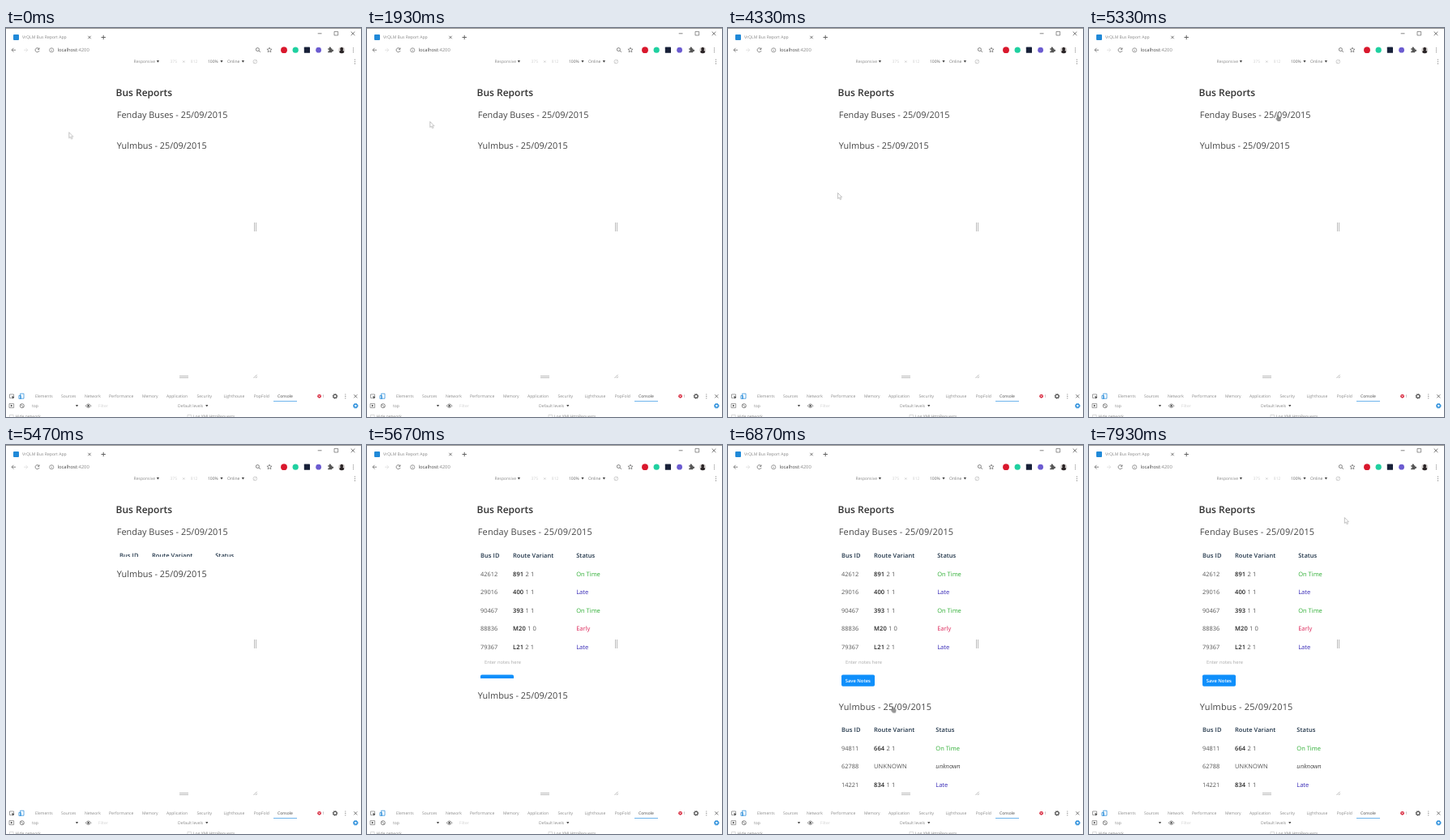
Animation, 438 px wide and 480 px high, one loop 8 s. Source, as an HTML page:

```html
<!DOCTYPE html>
<html lang="en">
<head>
<meta charset="utf-8">
<title>Bus Report App</title>
<style>
  html, body { margin: 0; width: 100%; height: 100%; overflow: hidden; background: #fff; }
  body, text { font-family: "Open Sans", "Noto Sans", sans-serif; text-rendering: geometricPrecision; }
  #stage { position: relative; width: 438px; height: 480px; overflow: hidden; }
  #stage > svg { position: absolute; left: 0; top: 0; }
  #page { position: absolute; left: 0; top: 0; width: 438px; height: 432px; overflow: hidden; }
  #page h1 { position: absolute; left: 135.5px; top: 70px; margin: 0; font: 600 12px/20px "Open Sans", "Noto Sans", sans-serif; color: #333; white-space: nowrap; }
  #list { position: absolute; left: 0; top: 90px; width: 438px; }
  .title { height: 34px; line-height: 36px; padding-left: 136.8px; font-size: 10.9px; color: #444; white-space: nowrap; }
  .panel { height: 0; overflow: hidden; margin-bottom: 4px; }
  .panel svg { display: block; }
  .line { fill: none; stroke: #666; stroke-width: .8; }
</style>
</head>
<body>
<div id="stage">
  <div id="page">
    <h1>Bus Reports</h1>
    <div id="list">
      <div class="title" id="title1">Fenday Buses - 25/09/2015</div>
      <div class="panel" id="panel1"></div>
      <div class="title" id="title2">Yulmbus - 25/09/2015</div>
      <div class="panel" id="panel2"></div>
    </div>
  </div>
  <svg id="chrome" width="438" height="480"></svg>
  <svg width="438" height="480">
    <path id="arrow" d="M.5 .5V7.6L2.2 6.2L3.4 8.8L4.6 8.2L3.5 5.8H5.6Z" fill="#fff" stroke="#aaa" stroke-width=".7"/>
    <path id="hand" d="M1.6 .6Q2.6 .2 2.7 1.2V2.8L5 3.3Q6 3.7 5.8 4.8L5.2 7.6H2.2L.4 5.2Q.2 4.2 1.6 4.5Z" fill="#999" stroke="#777" stroke-width=".8"/>
  </svg>
</div>
<script>
const LOOP = 8000;
const $ = id => document.getElementById(id);

const text = (x, y, s, size = 5, fill = '#888', extra = '') =>
  `<text x="${x}" y="${y}" font-size="${size}" fill="${fill}" ${extra}>${s}</text>`;
const line = (d, color = '#666', width = .8) =>
  `<path class="line" d="${d}" style="stroke:${color};stroke-width:${width}"/>`;
const dot = (x, y, r, fill) => `<circle cx="${x}" cy="${y}" r="${r}" fill="${fill}"/>`;
const ring = (x, y, r, color = '#666', width = .8) =>
  `<circle cx="${x}" cy="${y}" r="${r}" fill="none" stroke="${color}" stroke-width="${width}"/>`;
const box = (x, y, w, h, fill, rx = 0) =>
  `<rect x="${x}" y="${y}" width="${w}" height="${h}" rx="${rx}" fill="${fill}"/>`;
const frame = (x, y, w, h, color = '#666') => line(`M${x} ${y}h${w}v${h}h${-w}z`, color, .7);
const cross = (x, y, r, color = '#555') =>
  line(`M${x - r} ${y - r}l${2 * r} ${2 * r}M${x + r} ${y - r}l${-2 * r} ${2 * r}`, color, .8);
const dots = (x, y, color = '#777') => [-2.4, 0, 2.4].map(d => dot(x, y + d, .6, color)).join('');
const caret = (x, y) => `<path d="M${x - 1.6} ${y - 1.3}h3.2l-1.6 2.7z" fill="#444"/>`;
const gear = (x, y, color) => ring(x, y, 2, color, 1.2) +
  `<circle cx="${x}" cy="${y}" r="2.9" fill="none" stroke="${color}" stroke-width=".9" stroke-dasharray="1.14"/>`;

function star(x, y, r) {
  const pts = Array.from({ length: 10 }, (_, i) => {
    const a = i * Math.PI / 5, k = i % 2 ? r * .45 : r;
    return `${x + k * Math.sin(a)} ${y - k * Math.cos(a)}`;
  });
  return line(`M${pts.join('L')}Z`, '#666', .7);
}

function browserBar() {
  return box(0, 0, 438, 1, '#999') +
    box(9, 8, 7, 7, '#2089d8', 1) + text(20, 13.4, 'VrQLM Bus Report App', 5.1) +
    cross(103, 11.5, 1.7) + line('M117.5 11.5h5.4M120.2 8.8v5.4', '#555', .9) +
    line('M384.7 6.8h4.8') + frame(405, 4.4, 4.6, 4.6) + cross(428, 6.8, 2.3) +
    line('M12 27.2H7M9.4 24.8L7 27.2L9.4 29.6') +
    line('M22 27.2h4.8M24.5 24.9l2.3 2.3l-2.3 2.3', '#ddd') +
    line('M40.7 25.8A2.5 2.5 0 1 0 41 28M41 24.4v1.9h-2') +
    ring(56.2, 27.3, 2.6, '#777', .7) + line('M56.2 27v1.7M56.2 25.5v.7', '#777', .7) +
    text(63.6, 29.3, 'localhost<tspan fill="#888">:4200</tspan>', 5.8, '#444') +
    ring(310.4, 26.5, 2) + line('M312 28l1.9 1.9') + star(325, 27.2, 3.2) +
    dot(343, 27.2, 3.9, '#d9182d') + dot(357.2, 27.2, 3.6, '#1fd0a0') +
    box(367.8, 23.6, 7.2, 7.2, '#172038', .6) + dot(385.6, 27.2, 3.4, '#6b5bd0') +
    '<path d="M397.2 25.2h1.6a1.2 1.2 0 1 1 2 0h1.5v1.6a1.2 1.2 0 1 1 0 2v1.5h-5.1v-1.7a1 1 0 1 0 0-1.8z" fill="#555"/>' +
    dot(414.2, 27.2, 4, '#d8d4d2') +
    '<path d="M411.2 29.9q.3-2.2 1.7-2.5a2 2 0 1 1 2.6 0q1.4.3 1.7 2.5a4 4 0 0 1-6 0z" fill="#2b2527"/>' +
    dots(428.5, 27.2);
}

function deviceBar() {
  return text(157.6, 43.3, 'Responsive') + caret(187.4, 41.4) +
    text(202.5, 43.3, '375', 5, '#d0d0d0') + cross(219.3, 41.5, 1, '#bbb') +
    text(227.8, 43.3, '812', 5, '#d0d0d0') +
    text(249, 43.3, '100%', 5, '#666') + caret(266, 41.4) +
    text(273, 43.3, 'Online', 5, '#777') + caret(292.4, 41.4) +
    ring(307.3, 41.5, 2.3, '#bbb', .7) + line('M305 43.5l4.6-4', '#ccc', .6) +
    dots(430.5, 41.5) +
    line('M306.5 240v11M308.5 240v11M214 429.5h11M214 431.5h11', '#aaa') +
    line('M305.5 432l4.2-4.2M308 432l1.8-1.8', '#999', .7);
}

function devTools() {
  const tabs = [['Elements', 36], ['Sources', 68], ['Network', 97], ['Performance', 127],
    ['Memory', 168], ['Application', 198], ['Security', 235.5], ['Lighthouse', 268.5],
    ['PopFold', 305.8]];
  return frame(4.5, 452, 5, 4.6, '#777') + '<path d="M7 454l3.6 1.6l-1.5.5l-.7 1.6z" fill="#444"/>' +
    frame(17.6, 451.2, 4.4, 6, '#1a86d9') + frame(15.9, 453.6, 2.6, 3.8, '#1a86d9') +
    tabs.map(([s, x]) => text(x, 456.4, s)).join('') +
    text(335, 456.4, 'Console', 5, '#444') + box(330, 460, 29, 1, '#6fb4ec') +
    dot(386.6, 454.3, 2.4, '#d93045') + cross(386.6, 454.3, .8, '#fff') +
    text(390.3, 456.2, '1', 4.8) + gear(406, 454.4, '#555') + dots(418.8, 454.4) + cross(431.3, 454.4, 2) +
    frame(4, 463.6, 5.6, 5, '#777') + '<path d="M5.9 464.7l2.4 1.4l-2.4 1.4z" fill="#444"/>' +
    ring(19.8, 466.2, 2.5) + line('M18 464.4l3.6 3.6') +
    text(32, 468, 'top') + caret(87.5, 466.2) +
    line('M98.3 466.2q3.3-4.4 6.6 0q-3.3 4.4-6.6 0z') + dot(101.6, 466.2, 1.2, '#555') +
    text(114, 468, 'Filter', 5, '#d0d0d0') +
    text(212, 468, 'Default levels') + caret(247.8, 466.2) + gear(431.3, 466.2, '#1a86d9') +
    frame(4.5, 477.4, 4.6, 5, '#ccc') + text(11.6, 480.9, 'Hide network') +
    frame(224, 477.4, 4.6, 5, '#ccc') + text(231, 480.9, 'Log XMLHttpRequests');
}

const statusColor = { 'On Time': '#2fae35', Late: '#3426b5', Early: '#dc2458', unknown: '#444' };

// Baselines follow a fixed row pitch inside the panel
function table(rows, top, statusX) {
  const y = i => top + 22.5 * i;
  const head = [['Bus ID', 140], ['Route Variant', 179.9], ['Status', statusX]]
    .map(([s, x]) => text(x, y(0), s, 7.5, '#22364a', 'font-weight="600" letter-spacing=".06"')).join('');
  const body = rows.map(([id, route, variant, status], i) => {
    const label = variant ? `<tspan font-weight="600" fill="#222">${route}</tspan> ${variant}` : route;
    return text(140, y(i + 1), id, 7.4, '#555') +
      text(180, y(i + 1), label, 7.5, '#555', 'letter-spacing=".15"') +
      text(statusX, y(i + 1), status, 7.5, statusColor[status], status === 'unknown' ? 'font-style="italic"' : '');
  }).join('');
  return head + body;
}
const sheet = s => `<svg width="438" height="178">${s}</svg>`;

$('chrome').innerHTML = browserBar() + deviceBar() + devTools();
$('panel1').innerHTML = sheet(table([
  ['42612', '891', '2 1', 'On Time'],
  ['29016', '400', '1 1', 'Late'],
  ['90467', '393', '1 1', 'On Time'],
  ['88836', 'M20', '1 0', 'Early'],
  ['79367', 'L21', '2 1', 'Late']
], 15.1, 258.2) +
  text(145, 145.5, 'Enter notes here', 5.8, '#aaa') +
  box(140, 159.5, 41, 14.3, '#0f8ffb', 1.8) +
  text(144.8, 168.9, 'Save Notes', 5.8, '#fff', 'font-weight="600"'));
$('panel2').innerHTML = sheet(table([
  ['94811', '664', '2 1', 'On Time'],
  ['62788', 'UNKNOWN', '', 'unknown'],
  ['14221', '834', '1 1', 'Late']
], 14.4, 256.3));

const play = (el, frames) => el.animate(frames, { duration: LOOP, iterations: Infinity });

function open(n, start, end) {
  const a = start / LOOP, b = end / LOOP;
  const change = (el, prop, from, to) => play(el, [
    { offset: 0, [prop]: from }, { offset: a, [prop]: from, easing: 'ease' },
    { offset: b, [prop]: to }, { offset: 1, [prop]: to }
  ]);
  change($('panel' + n), 'height', '0px', '178px');
  change($('title' + n), 'letterSpacing', '0px', '0.19px');
}

// Pointer steps: time, shape, x, y
const pointer = [
  [0, 'arrow', 77.3, 128.2], [1930, 'arrow', 77.3, 115], [2000, 'arrow', 77.5, 105], [2070, 'arrow', 78, 102],
  [3530, 'arrow', 78.5, 116], [3600, 'arrow', 82, 130], [3670, 'arrow', 87, 150], [3730, 'arrow', 93, 170],
  [3800, 'arrow', 98, 188], [3870, 'arrow', 101, 197], [3930, 'arrow', 103, 200.5],
  [4200, 'arrow', 115, 203], [4270, 'arrow', 135, 203], [4400, 'arrow', 158, 200], [4470, 'arrow', 166, 199],
  [5330, 'hand', 230.6, 107], [5400, 'none', 230.6, 107], [6670, 'hand', 201.2, 322.5],
  [7470, 'arrow', 182, 350], [7530, 'arrow', 162, 365], [7600, 'arrow', 190, 320],
  [7670, 'arrow', 245, 220], [7870, 'arrow', 300, 115], [7930, 'arrow', 314.8, 89]
];

for (const shape of ['arrow', 'hand']) {
  const frames = pointer.map(([time, kind, x, y]) => ({
    offset: time / LOOP, easing: 'step-end',
    transform: `translate(${x}px, ${y}px)`, opacity: kind === shape ? 1 : 0
  }));
  play($(shape), [...frames, { ...frames.at(-1), offset: 1 }]);
}
open(1, 5440, 5790);
open(2, 6670, 7000);
</script>
</body>
</html>
```
